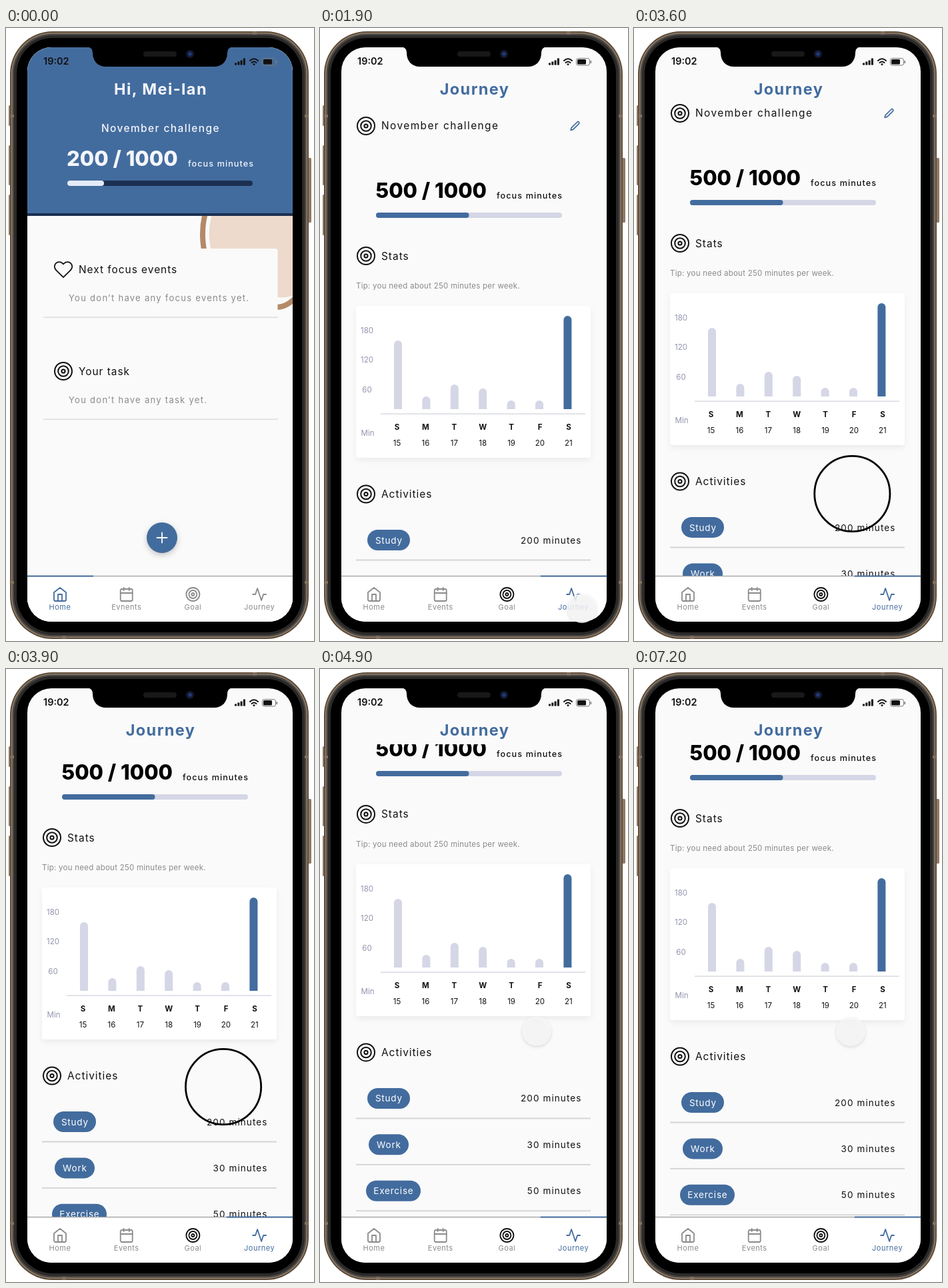
An HTML page for the animation above (7.3 s loop, 462x920 px).

```html
<!DOCTYPE html>
<html lang="en">
<head>
<meta charset="utf-8">
<title>Focus app</title>
<style>
  html, body { margin: 0; width: 100%; height: 100%; overflow: hidden; background: #fff; }
  svg { display: block; width: 462px; height: 920px; }
  text { font-family: Inter, "Open Sans", sans-serif; fill: #111; white-space: pre; }
  .mid { text-anchor: middle; }
  .end { text-anchor: end; }
  .title { font-size: 23.5px; font-weight: 700; letter-spacing: 1.4px; }
  .total { font-size: 31px; font-weight: 800; fill: #000; }
  .unit { font-size: 12.6px; font-weight: 500; letter-spacing: 1.1px; }
  .head { font-size: 15.4px; letter-spacing: 1px; }
  .wide { letter-spacing: 1.45px; }
  .medium { font-weight: 500; }
  .note { font-size: 13px; letter-spacing: 1.28px; fill: #8a8a8a; }
  .tip { font-size: 11.5px; letter-spacing: .25px; fill: #8a8a8a; }
  .axis { font-size: 11.5px; fill: #9194ad; }
  .day { font-size: 11.5px; font-weight: 700; }
  .date { font-size: 11.5px; }
  .row { font-size: 13.5px; letter-spacing: 1.1px; }
  .chip { font-size: 13.5px; letter-spacing: .8px; fill: #fff; }
  .tab { font-size: 11px; letter-spacing: .5px; fill: #8a8a8a; }
  .active { fill: #436c9e; }
  .clock { font-size: 14.5px; font-weight: 600; }
  .light text { fill: #f4f6fb; }
  .line { fill: none; stroke: currentColor; stroke-linecap: round; stroke-linejoin: round; }
  #dot { filter: drop-shadow(0 2px 2px rgba(0, 0, 0, .14)); }
  #fab { filter: drop-shadow(0 3px 4px rgba(0, 0, 0, .22)); }
  #card { filter: drop-shadow(0 4px 4px rgba(0, 0, 0, .06)); }
</style>
</head>
<body>
<svg viewBox="0 0 462 920">
  <defs>
    <clipPath id="screen"><rect x="32" y="29" width="398" height="862" rx="36"/></clipPath>
    <clipPath id="view"><rect x="32" y="113" width="398" height="709"/></clipPath>
    <clipPath id="below"><rect x="32" y="282" width="398" height="540"/></clipPath>
    <g id="target">
      <circle cx="12" cy="12" r="10"/><circle cx="12" cy="12" r="6"/><circle cx="12" cy="12" r="2"/>
    </g>
    <path id="house" d="M3 9l9-7 9 7v11a2 2 0 0 1-2 2H5a2 2 0 0 1-2-2zM9 22V12h6v10"/>
    <g id="calendar">
      <rect x="3" y="4" width="18" height="18" rx="2"/><path d="M16 2v4M8 2v4M3 10h18"/>
    </g>
    <path id="pulse" d="M22 12h-4l-3 9L9 3l-3 9H2"/>
    <path id="heart" d="M20.8 4.6a5.5 5.5 0 0 0-7.8 0l-1 1-1-1a5.5 5.5 0 0 0-7.8 7.8l1 1 7.8 7.8 7.8-7.8 1-1a5.5 5.5 0 0 0 0-7.8z"/>
    <path id="pencil" d="M17 3a2.83 2.83 0 1 1 4 4L7.5 20.5 2 22l1.5-5.5z"/>
  </defs>

  <!-- phone body -->
  <g fill="#8f7a66">
    <rect x="4" y="116" width="5" height="31" rx="1.5"/>
    <rect x="4" y="176" width="5" height="60" rx="1.5"/>
    <rect x="4" y="250" width="5" height="61" rx="1.5"/>
    <rect x="452" y="195" width="6" height="97" rx="1.5"/>
  </g>
  <rect x="6" y="5" width="448" height="912" rx="64" fill="#5e4c3a"/>
  <rect x="8" y="7" width="444" height="908" rx="62" fill="#94826f"/>
  <rect x="9.500" y="8.500" width="441" height="905" rx="60.500" fill="#4a4643"/>
  <rect x="12" y="11" width="436" height="900" rx="58" fill="#2b2a29"/>
  <rect x="16" y="15" width="428" height="892" rx="54" fill="#000"/>
  <path d="M370 7.500h6M84 914.500h6M7 132h5M7 832h5M448 132h5M448 832h5" stroke="#86735e" stroke-width="4"/>

  <g clip-path="url(#screen)">
    <rect x="32" y="29" width="398" height="862" fill="#fafafa"/>
    <g id="journey">
      <g clip-path="url(#view)"><g id="scroll"></g></g>
      <text class="title mid active" x="232" y="100">Journey</text>
    </g>
    <g id="home"></g>
    <text class="clock" x="56" y="55">19:02</text>
    <path d="M343 55.500v-3h3v3zM347.300 55.500v-5h3v5zM351.600 55.500v-7h3v7zM355.900 55.500v-10h3v10z" fill="#111"/>
    <g class="line" color="#111" stroke-width="2">
      <path d="M366 49q6-5.500 12 0M368.500 52q3.500-3 7 0"/><circle cx="372" cy="54.500" r=".6"/>
    </g>
    <rect x="384.500" y="45.500" width="20" height="10.500" rx="3" fill="none" stroke="#777"/>
    <rect x="386" y="47" width="13" height="7.500" rx="1.500" fill="#111"/>
    <path d="M406.300 49v4" stroke="#777" stroke-width="1.500"/>
  </g>

  <path d="M121 28Q130 29 130 37C130 50 138 58 150 58H312C324 58 332 50 332 37Q332 29 341 28Z"/>
  <rect x="206" y="35" width="50" height="8" rx="4" fill="#181818"/>
  <circle cx="276" cy="39" r="6" fill="#121a2c"/>
  <circle cx="276" cy="39" r="2.800" fill="#22397c"/>

  <g id="cursor">
    <circle id="dot" fill="#f7f7f7" fill-opacity=".85"/>
    <circle id="ring" fill="none" stroke="#000" stroke-width="2.800"/>
  </g>
</svg>
<script>
const BLUE = '#436c9e', NAVY = '#1b2f50', PALE = '#d5d6e6', GRAY = '#8a8a8a', INK = '#111';
const $ = id => document.getElementById(id);

const text = (cls, x, y, s) => `<text class="${cls}" x="${x}" y="${y}">${s}</text>`;
const rect = (x, y, w, h, fill, r = 0) =>
  `<rect x="${x}" y="${y}" width="${w}" height="${h}" rx="${r}" fill="${fill}"/>`;
// icons live on a 24-unit grid and are placed by their centre
const icon = (id, cx, cy, scale, width, color) =>
  `<g class="line" color="${color}" stroke-width="${width / scale}"
    transform="translate(${cx - 12 * scale} ${cy - 12 * scale}) scale(${scale})"><use href="#${id}"/></g>`;
const bullet = (cx, cy) => icon('target', cx, cy, 1.3, 2, INK);

function tabs(active, labels, goalColor) {
  const icons = ['house', 'calendar', 'target', 'pulse'];
  return rect(32, 822, 398, 69, '#fff') + rect(32, 822, 398, 1.2, '#9a9a9a')
    + rect(32 + active * 99.6, 821.6, 99, 2, BLUE)
    + labels.map((label, i) => {
      const cx = 81 + i * 99.7, on = i === active;
      const color = on ? BLUE : i === 2 ? goalColor : GRAY;
      return icon(icons[i], cx, 850, 1, 1.8, color) + text(on ? 'tab mid active' : 'tab mid', cx, 873, label);
    }).join('');
}

function homeScreen() {
  return rect(32, 29, 398, 862, '#fafafa')
    + `<g clip-path="url(#below)">
        <path d="M309 280C303 300 304 320 308 335L400 403Q420 407 434 400V280Z" fill="#eddacc"/>
        <path d="M299 278C293 300 294 325 300 345C315 385 370 415 404 419C416 420 426 414 436 403"
          fill="none" stroke="#b48a68" stroke-width="8"/>
      </g>`
    + rect(56, 331, 351.5, 103, '#fafafa', 4)
    + rect(32, 29, 398, 250, BLUE) + rect(32, 278, 398, 4, NAVY)
    + '<g class="light">'
    + text('title mid', 232, 100, 'Hi, Mei-lan')
    + text('head wide medium mid', 232, 156, 'November challenge')
    + text('total', 91, 207, '200 / 1000') + text('unit', 273, 208, 'focus minutes') + '</g>'
    + rect(92, 229, 278, 8, NAVY, 4) + rect(92, 229, 55, 8, '#e4ecf9', 4)
    + icon('heart', 86, 362.5, 1.27, 1.8, INK) + text('head', 109, 368, 'Next focus events')
    + text('note', 94, 409.5, 'You don’t have any focus events yet.') + rect(56, 433.5, 352, 1.6, '#dedede')
    + bullet(86, 515) + text('head', 109, 521, 'Your task')
    + text('note', 94, 562.5, 'You don’t have any task yet.') + rect(56, 586.5, 352, 1.6, '#dedede')
    + `<circle id="fab" cx="234" cy="765" r="23" fill="${BLUE}"/>`
    + '<path class="line" color="#fff" stroke-width="1.8" d="M226.500 765h15M234 757.500v15"/>'
    + tabs(0, ['Home', 'Evnents', 'Goal', 'Journey'], GRAY);
}

function chart() {
  const heights = [103, 19, 37, 31, 13, 13, 140];
  const columns = heights.map((h, i) => {
    const x = 111 + i * 42.4, cx = 115.5 + i * 42.9, last = i === 6;
    return `<path d="M${x} 572v${6 - h}a6 6 0 0 1 12 0v${h - 6}z" fill="${last ? BLUE : PALE}"/>`
      + text('day mid', cx, 603, 'SMTWTFS'[i]) + text('date mid', cx, 627, 15 + i);
  });
  return `<g id="card">${rect(54, 417, 352, 228, '#fff', 4)}</g>`
    + [180, 120, 60].map((n, i) => text('axis mid', 70.5, 458 + i * 44.3, n)).join('')
    + text('axis', 61.5, 612, 'Min') + rect(91, 578.6, 307, 1, '#c6c8d4') + columns.join('');
}

function activity([name, x, width, minutes], i) {
  const y = 753 + i * 69.4;
  return rect(x, y, width, 31, BLUE, 15.5)
    + text('chip mid', x + width / 2 + .4, y + 20.5, name)
    + text('row end', 392.5, y + 20.5, minutes + ' minutes')
    + rect(54, y + 44.5, 352, 2, '#d6d6da');
}

function journeyContent() {
  return bullet(69, 147) + text('head wide', 92, 152, 'November challenge')
    + icon('pencil', 382.5, 147, .64, 1.7, BLUE)
    + text('total', 83.5, 255, '500 / 1000') + text('unit', 265, 256, 'focus minutes')
    + rect(84, 277, 279, 8, PALE, 4) + rect(84, 277, 139.5, 8, BLUE, 4)
    + bullet(69, 342) + text('head', 92, 347.5, 'Stats')
    + text('tip', 54, 391, 'Tip: you need about 250 minutes per week.')
    + chart() + bullet(69, 699.5) + text('head', 92, 705, 'Activities')
    + [['Study', 71, 64, 200], ['Work', 73, 60, 30], ['Exercise', 69, 82, 50]].map(activity).join('');
}

$('scroll').innerHTML = journeyContent();
$('journey').insertAdjacentHTML('beforeend', tabs(3, ['Home', 'Events', 'Goal', 'Journey'], INK));
$('home').innerHTML = homeScreen();

const linear = u => u;
const smooth = u => u * u * (3 - 2 * u);
const easeOut = u => 1 - (1 - u) ** 3;

// keys are [time, value] pairs; each segment is eased the same way
function track(t, keys, ease = linear) {
  const i = keys.findIndex(k => k[0] > t);
  if (i === 0) return keys[0][1];
  if (i < 0) return keys.at(-1)[1];
  const [[t0, a], [t1, b]] = [keys[i - 1], keys[i]];
  return a + (b - a) * ease((t - t0) / (t1 - t0));
}

const LOOP = 7300, STEP = 100, DRAG = 3300, RELEASE = 4700;
const moveX = [[0, 205], [600, 393], [2300, 393], [2800, 329], [DRAG, 328], [4300, 325]];
const moveY = [[0, 448], [600, 871], [2300, 871], [2800, 755]];
const dragY = [[DRAG, 755], [3400, 745], [3600, 699], [3900, 627], [4300, 541], [4500, 541], [5000, 544]];
const dragScroll = [[3400, 0], [3500, 5], [3600, 19], [3900, 89], [4100, 128], [4300, 146]];
const bounce = [[RELEASE, 0], [5200, 28]];
const press = [[700, 0], [900, 1], [1000, 1], [1200, 0], [2900, 0], [3100, 1], [RELEASE, 1], [4900, 0]];
const homeOpacity = [[1000, 1], [1600, 0]];

function draw(now) {
  const t = Math.floor(now % LOOP / STEP) * STEP;
  const p = track(t, press), radius = 22 + 34.6 * p;
  const x = track(t, moveX, smooth);
  const y = t < DRAG ? track(t, moveY, smooth) : track(t, dragY);
  const scroll = track(t, dragScroll) - track(t, bounce, easeOut);
  $('home').setAttribute('opacity', track(t, homeOpacity, smooth));
  $('scroll').setAttribute('transform', `translate(0 ${-scroll})`);
  $('cursor').setAttribute('transform', `translate(${x} ${y})`);
  $('cursor').setAttribute('opacity', t < STEP ? 0 : 1);
  $('dot').setAttribute('r', radius);
  $('dot').setAttribute('opacity', 1 - p);
  $('ring').setAttribute('r', radius);
  $('ring').setAttribute('opacity', p);
}

const start = performance.now();
function tick() {
  draw(performance.now() - start);
  requestAnimationFrame(tick);
}
tick();
</script>
</body>
</html>
```
